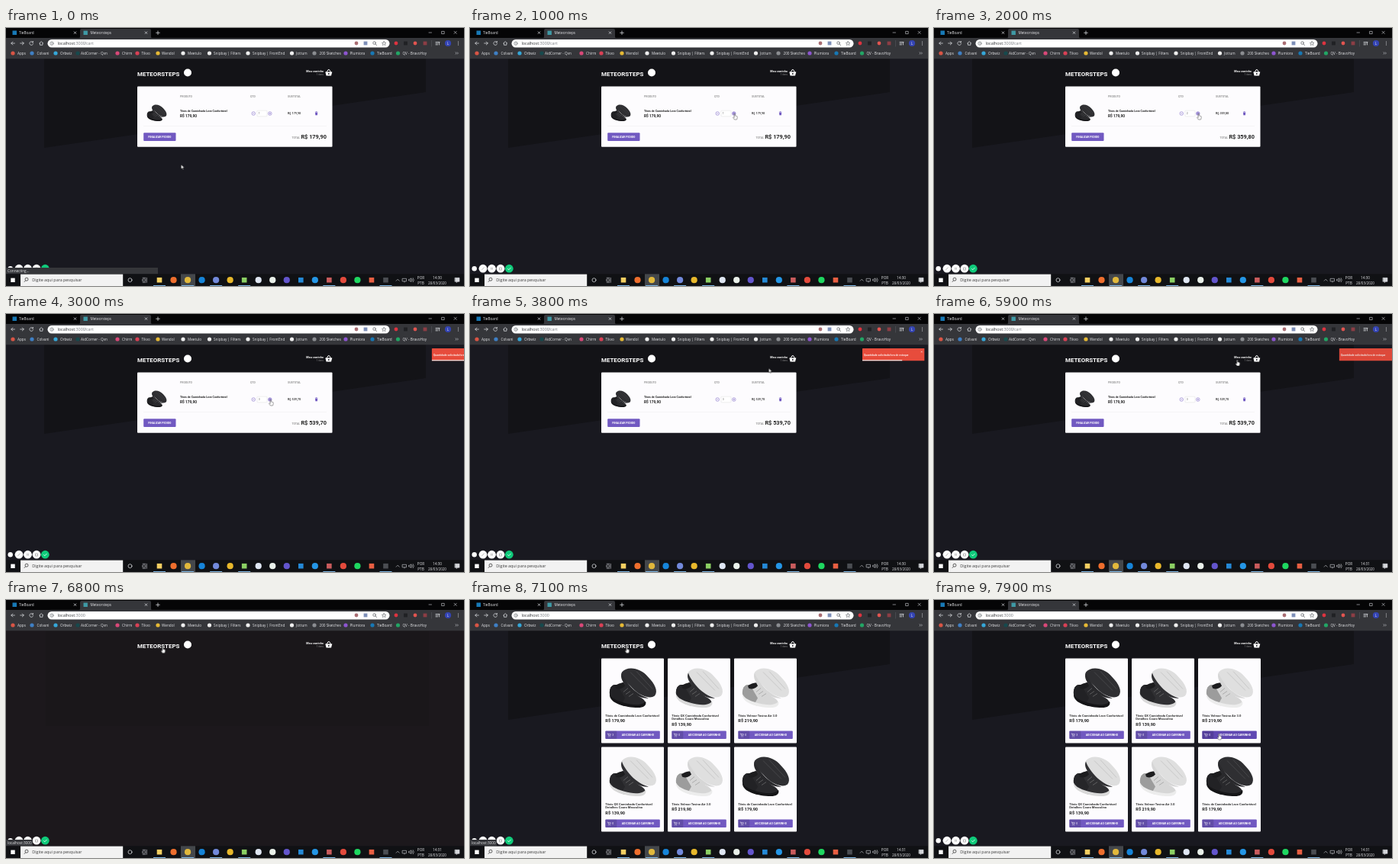
Write an HTML page that moves like this. It is 600x338 px and loops after 8000 ms.

```html
<!DOCTYPE html>
<html lang="pt-BR">
<head>
<meta charset="utf-8">
<title>Carrinho</title>
<style>
html, body { margin: 0; width: 100%; height: 100%; overflow: hidden; background: #191920; }
svg { display: block; width: 100vw; height: 100vh; }
text { white-space: pre; }
.ui { font-family: "Open Sans", "Noto Sans", sans-serif; font-size: 4.7px; fill: #e4e5e8; }
.page { font-family: Roboto, Arial, sans-serif; font-weight: 700; fill: #222; }
.line { fill: none; stroke: #d4d6da; stroke-width: .8; stroke-linecap: round; stroke-linejoin: round; }
.dark { stroke: #5f6368; }
.url { font-size: 5.4px; fill: #777b80; }
.mid { text-anchor: middle; }
.end { text-anchor: end; }
.label { fill: #999; font-size: 3.5px; }
.light { fill: #fff; }
.thin { font-weight: 400; }
.accent { fill: #7159c1; }

/* hard changes */
.connecting, .cart, .shop, .blank, .one, .two, .three, .before, .after,
.toCart, .toHome, .menu, .plus, .arrow, .hand, .hot { animation: 8s step-end infinite; }
.connecting { animation-name: connecting; }
.cart { animation-name: cart; }
.shop { animation-name: shop; }
.blank { animation-name: blank; }
.one { animation-name: one; }
.two { animation-name: two; }
.three { animation-name: three; }
.before { animation-name: before; }
.after { animation-name: after; }
.toCart { animation-name: toCart; }
.toHome { animation-name: toHome; }
.menu { animation-name: menu; }
.plus { animation-name: plus; }
.arrow { animation-name: arrow; }
.hand { animation-name: hand; }
.hot { animation-name: hot; }
@keyframes connecting { 0% { opacity: 1 } 6.9%, 100% { opacity: 0 } }
@keyframes cart { 0% { opacity: 1 } 83.1%, 100% { opacity: 0 } }
@keyframes shop { 0% { opacity: 0 } 88.7%, 100% { opacity: 1 } }
@keyframes blank { 0% { opacity: 0 } 83.1% { opacity: 1 } 88.7%, 100% { opacity: 0 } }
@keyframes one { 0% { opacity: 1 } 18.1%, 100% { opacity: 0 } }
@keyframes two { 0% { opacity: 0 } 18.1% { opacity: 1 } 25.6%, 100% { opacity: 0 } }
@keyframes three { 0% { opacity: 0 } 25.6%, 100% { opacity: 1 } }
@keyframes before { 0% { opacity: 1 } 51.3%, 100% { opacity: 0 } }
@keyframes after { 0% { opacity: 0 } 51.3%, 100% { opacity: 1 } }
@keyframes toCart { 0% { opacity: 0 } 49.4% { opacity: 1 } 71.9%, 100% { opacity: 0 } }
@keyframes toHome { 0% { opacity: 0 } 79.2% { opacity: 1 } 91.9%, 100% { opacity: 0 } }
@keyframes menu { 0% { opacity: 1 } 49.4% { opacity: .7 } 71.9%, 100% { opacity: 1 } }
@keyframes plus { 0% { fill: #fff } 10.6% { fill: #b9aee0 } 43.8%, 100% { fill: #fff } }
@keyframes arrow { 0% { opacity: 1 } 10.6% { opacity: 0 } 43.8% { opacity: 1 } 49.4% { opacity: 0 } 74.6% { opacity: 1 } 78.6% { opacity: 0 } 91.9% { opacity: 1 } 96.2%, 100% { opacity: 0 } }
@keyframes hand { 0% { opacity: 0 } 10.6% { opacity: 1 } 43.8% { opacity: 0 } 49.4% { opacity: 1 } 74.6% { opacity: 0 } 78.6% { opacity: 1 } 91.9% { opacity: 0 } 96.2%, 100% { opacity: 1 } }
@keyframes hot { 0% { fill: #7159c1 } 96.2%, 100% { fill: #6048b2 } }

.cursor { animation: cursor 8s ease-in-out infinite; }
@keyframes cursor {
  0%, 2% { transform: translate(229.5px, 179px) }
  11%, 43% { transform: translate(346.7px, 112px) }
  49.6%, 70% { transform: translate(403.3px, 60.5px) }
  73%, 74% { transform: translate(397.3px, 60px) }
  79%, 91.3% { transform: translate(205.3px, 61.5px) }
  97%, 100% { transform: translate(373.3px, 175px) }
}
.toast { animation: toast 8s cubic-bezier(.215, .61, .355, 1) infinite; }
@keyframes toast {
  0%, 34.07% { transform: translateX(750px); opacity: 1 }
  39.69% { transform: translateX(-6px) }
  41.1% { transform: translateX(2.5px) }
  42.5% { transform: translateX(-1.25px) }
  43.44% { transform: none }
  71.44% { transform: none; animation-timing-function: ease }
  73.31% { transform: translateX(-5px); opacity: 1; animation-timing-function: ease }
  80.8% { transform: translateX(500px); opacity: 0 }
  100% { transform: translateX(750px); opacity: 0 }
}
.progress { transform-box: fill-box; transform-origin: left; animation: progress 8s linear infinite; }
@keyframes progress {
  0%, 34.07% { transform: none }
  71.57%, 100% { transform: scaleX(0) }
}
</style>
</head>
<body>
<svg viewBox="0 0 600 338" preserveAspectRatio="none">
  <rect width="600" height="338" fill="#191920"/>
  <path d="M50 40H550V84L50 157Z" fill="#131317"/>
  <g class="blank">
    <rect y="40" width="600" height="283" fill="#1c181c"/>
    <rect x="52" y="40" width="502" height="125" fill="#1a171a"/>
  </g>

  <!-- page header -->
  <g class="page">
    <text class="light" x="172" y="62.7" font-size="7.9">METEORSTEPS</text>
    <circle class="light" cx="238" cy="58.5" r="5"/>
    <g class="menu">
      <text class="end light" x="416" y="58" font-size="3.8">Meu carrinho</text>
      <text class="end thin" x="416" y="62.2" font-size="3.2" fill="#888">1 itens</text>
      <path class="light" d="M418.3 57.6H427.3L426 62.6H419.6Z"/>
      <path d="M420 58L422 54.7H423.6L425.6 58" fill="none" stroke="#fff"/>
      <circle cx="422.8" cy="60" r=".9" fill="#191920"/>
    </g>
  </g>

  <!-- cart -->
  <g class="cart page">
    <rect x="172" y="76.5" width="255.5" height="79.3" rx="1" fill="#fdfcfe"/>
    <text class="label" x="228" y="91.3">PRODUTO</text>
    <text class="label" x="320" y="91.3">QTD</text>
    <text class="label" x="369" y="91.3">SUBTOTAL</text>
    <g id="thumb" transform="translate(180.2 95) scale(.42)"></g>
    <text x="228" y="109.9" font-size="3.63">Tênis de Caminhada Leve Confortável</text>
    <text x="228" y="116.7" font-size="4.8">R$ 179,90</text>
    <g fill="#fff" stroke="#7159c1" stroke-width=".5">
      <circle cx="324.2" cy="112" r="2.3"/>
      <circle class="plus" cx="345.8" cy="112" r="2.3"/>
      <path d="M323 112H325.4M344.6 112H347M345.8 110.8V113.2"/>
      <rect x="329" y="108.2" width="13" height="7.6" rx=".8" stroke="#ddd"/>
    </g>
    <g id="amounts"></g>
    <path class="accent" d="M405 110.7H408.2L407.9 114.3H405.3ZM404.8 109.7H405.9L406.2 109.3H407L407.3 109.7H408.4V110.3H404.8Z"/>
    <path d="M180 128.5H420" stroke="#eee" stroke-width=".5"/>
    <rect class="accent" x="180.2" y="137.2" width="42.3" height="10.8" rx="1"/>
    <text class="mid light" x="201.3" y="143.9" font-size="3.45">FINALIZAR PEDIDO</text>
    <text class="label end" x="385" y="145.2">TOTAL</text>
  </g>

  <g id="shop" class="shop page"></g>

  <!-- toast -->
  <g class="toast">
    <rect x="514" y="45" width="81.3" height="16.3" rx=".5" fill="#e74c3c"/>
    <text class="page light" x="516" y="54.8" font-size="3.45" style="font-weight:500">Quantidade solicitada fora de estoque</text>
    <path d="M590.8 48.6L592.6 50.4M592.6 48.6L590.8 50.4" stroke="#fff" stroke-width=".6"/>
    <rect class="progress" x="514" y="60" width="81.3" height="1.3" fill="#fff" opacity=".8"/>
  </g>

  <!-- recorder bubbles -->
  <g fill="#fff">
    <circle cx="5.7" cy="315.2" r="3.2"/>
    <circle cx="17" cy="315.2" r="5.4"/>
    <circle cx="28.5" cy="315.2" r="5.4"/>
    <circle cx="40" cy="315.2" r="5.4"/>
    <circle cx="51.3" cy="315.2" r="5.4" fill="#0fca7a"/>
    <path d="M15.4 317L18.6 313.5M27.7 313.7V316.7M29.3 313.7V316.7M38.5 314H41.5V317H38.5Z" fill="none" stroke="#999" stroke-width=".7"/>
    <path d="M49.2 315.3L50.8 316.8L53.5 313.9" fill="none" stroke="#fff" stroke-width=".8"/>
  </g>

  <!-- link status -->
  <g class="ui">
    <g class="connecting"><rect y="314" width="199" height="8.5" fill="#35363a"/><text x="2" y="320">Connecting...</text></g>
    <g class="toCart"><rect y="314" width="45.5" height="8.5" fill="#35363a"/><text x="2" y="320">localhost:3000/cart</text></g>
    <g class="toHome"><rect y="314" width="35" height="8.5" fill="#35363a"/><text x="2" y="320">localhost:3000</text></g>
  </g>

  <!-- browser -->
  <g class="ui">
    <rect width="600" height="13.5" fill="#050506"/>
    <path d="M95 13.5Q97 13.5 97 11.5V3Q97 1 99 1H188Q190 1 190 3V11.5Q190 13.5 192 13.5Z" fill="#35363a"/>
    <rect y="13" width="600" height="27.3" fill="#35363a"/>
    <rect x="54.5" y="15" width="448" height="10.6" rx="5.3" fill="#fff"/>
    <rect x="8.5" y="3.5" width="5.5" height="5.5" fill="#1778b5"/>
    <text x="17" y="8.3">TieBoard</text>
    <rect x="101.5" y="3.6" width="5.4" height="5.4" fill="#3f9aa5"/>
    <text x="110.5" y="8.3">Meteorsteps</text>
    <text class="url" x="67.500" y="22.2"><tspan fill="#2b2d30">localhost</tspan>:3000<tspan class="path"></tspan></text>
    <text class="url cart" x="103" y="22.2">/cart</text>
    <g class="line">
      <path d="M89.2 4.9L91.8 7.5M91.8 4.9L89.2 7.5M182.2 4.9L184.8 7.5M184.8 4.9L182.2 7.5M196.7 6.3H201.3M199 4V8.6"/>
      <path d="M554 6H557.5M571 4.4H574.2V7.6H571ZM587 4.2L590.3 7.5M590.3 4.2L587 7.5" stroke-width=".6"/>
      <path d="M11.4 20H6.8M8.8 18L6.8 20L8.8 22M35.2 18.6A2.4 2.4 0 1 0 35.6 20.7M35.4 17.4V18.9H33.9M43.7 20L46.2 17.7L48.7 20M44.5 19.7V22.3H47.9V19.7"/>
      <path d="M18.7 20H23.3M21.3 18L23.3 20L21.3 22"/>
      <path d="M563 18.5H568M563 20.2H566M563 21.9H565.5M567.5 18.5V22"/>
      <path d="M589 31.8L590.2 33L589 34.2M591.2 31.8L592.4 33L591.2 34.2" stroke-width=".6"/>
    </g>
    <g class="line dark">
      <circle cx="60" cy="20.2" r="2.2" stroke-width=".6"/><path d="M60 20V21.2M60 19V19.1" stroke-width=".6"/>
      <circle cx="482.6" cy="19.6" r="1.8"/><path d="M484 21L485.6 22.6"/>
      <path d="M495.2 17.5L496 19.3L498 19.4L496.5 20.7L497 22.6L495.2 21.6L493.4 22.6L493.9 20.7L492.4 19.4L494.4 19.3Z" stroke-width=".6"/>
    </g>
    <path d="M557.5 16V24.5" stroke="#5b5d62" stroke-width=".5"/>
    <circle cx="579" cy="20" r="4.1" fill="#3444b4"/><text class="mid" x="579" y="21.7">L</text>
    <g fill="#d4d6da"><circle cx="592.5" cy="18" r=".6"/><circle cx="592.5" cy="20" r=".6"/><circle cx="592.5" cy="22" r=".6"/></g>
    <g id="extensions"></g>
    <g id="bookmarks"></g>
  </g>

  <!-- taskbar -->
  <g class="ui">
    <rect y="322.3" width="600" height="15.7" fill="#101114"/>
    <rect x="6.3" y="327.6" width="5.4" height="5.4" fill="#fff"/>
    <rect x="19" y="322.6" width="134.2" height="15.4" fill="#f2f2f2"/>
    <g fill="none" stroke="#222" stroke-width=".7"><circle cx="27" cy="329.2" r="2"/><path d="M25.6 330.8L23.8 332.8"/></g>
    <text x="34.3" y="332.2" style="font-size:5.35px;fill:#3a3a3a">Digite aqui para pesquisar</text>
    <rect x="229" y="322.3" width="19" height="15.7" fill="#44474b"/>
    <g class="line">
      <circle cx="162.5" cy="330.2" r="2.5"/>
      <path d="M179.2 329H182.8V331.7H179.2ZM179.2 327.3H182.8M179.2 333.3H182.8M184.3 327.3V333.3" stroke-width=".6"/>
      <path d="M511.2 331.2L513.2 329.2L515.2 331.2M519.5 328.3H524.5V331.8H519.5ZM522 332V333M528 329.3H529L530.7 327.8V332.5L529 331H528ZM532 328.7Q533.3 330.2 532 331.6M533.3 327.6Q535.6 330.2 533.3 332.8" stroke-width=".6"/>
      <path d="M588.3 327.3H594V332.2H591.6L590.3 333.6V332.2H588.3Z" fill="#d4d6da" stroke-width=".6"/>
    </g>
    <g id="apps"></g>
    <g class="mid">
      <text x="543.5" y="328.8">POR</text><text x="543.5" y="336">PTB</text>
      <text class="before" x="565" y="328.8">14:30</text><text class="after" x="565" y="328.8">14:31</text>
      <text x="565" y="336" style="font-size:4.5px">28/03/2020</text>
    </g>
  </g>

  <!-- pointer -->
  <g class="cursor" stroke="#111" stroke-width=".4" fill="#fff">
    <path class="arrow" d="M0 0V5.6L1.3 4.4L2.2 6.4L3 6L2.2 4.1H3.9Z"/>
    <path class="hand" d="M-.6 .5Q0 -.3 .6 .5V3Q1.2 2.6 1.6 3.2Q2.2 2.9 2.5 3.5Q3.2 3.3 3.3 4V6L2.6 8H-.4L-2.2 5.2Q-2 4.1-.6 5.3Z"/>
  </g>
</svg>
<script>
const fill = (id, items, draw) => {
  document.getElementById(id).innerHTML = items.map(draw).join("");
};
const dot = (x, y, r, color) => `<circle cx="${x}" cy="${y}" r="${r}" fill="${color}"/>`;
const box = (x, y, r, color) => `<rect x="${x - r}" y="${y - r}" width="${2 * r}" height="${2 * r}" fill="${color}"/>`;

// upper, quarter, sole and back shoe
const styles = {
  black: ["#29292c", "#222225", "#151517", "#2f2f32"],
  mixed: ["#303033", "#262629", "#d9d9d9", "#dedede"],
  white: ["#d6d6d6", "#9c9c9c", "#ececec", "#dfdfdf"]
};
const shoes = name => {
  const [upper, quarter, sole, back] = styles[name];
  return `<path d="M27 18C35 9 52 13 61 24C70 33 75 43 70 49C62 55 46 46 38 36C31 29 24 24 27 18Z" fill="${back}"/>
    <path d="M27 19C30 29 45 48 62 52C51 54 38 44 31 34C26 28 25 23 27 19Z" fill="${upper}"/>
    <path d="M38 18L62 42M46 17L67 40" stroke="#8884" stroke-width="1"/>
    <path d="M11 47C10 38 15 33 21 35L29 31C35 37 43 47 53 52C59 56 59 60 54 62L30 62C20 59 12 54 11 47Z" fill="${upper}"/>
    <path d="M11 47C10 38 15 33 21 35L31 52L27 59C18 56 12 52 11 47Z" fill="${quarter}"/>
    <path d="M18 36Q23 32 29 32L31 36Q25 42 19 39Z" fill="#1d1d1f"/>
    <path d="M29 44L35 39M32 47L38 43M36 50L42 46" stroke="#8888" stroke-width="1"/>
    <path d="M11 47C15 55 28 58 38 60C48 62 56 60 58 56C60 62 55 64.5 48 64.5C32 64.5 10 59 11 47Z" fill="${sole}"/>`;
};
document.getElementById("thumb").innerHTML = shoes("black");

fill("amounts", [["one", 1, "179,90"], ["two", 2, "359,80"], ["three", 3, "539,70"]], ([name, count, sum]) =>
  `<g class="${name}">
    <text class="thin" x="330.7" y="113.3" font-size="3.5" fill="#666">${count}</text>
    <text x="369" y="113.4" font-size="3.8" style="font-weight:500">R$ ${sum}</text>
    <text class="end" x="420" y="145.3" font-size="7.35">R$ ${sum}</text>
  </g>`);

const goods = {
  black: ["179,90", "Tênis de Caminhada Leve Confortável"],
  mixed: ["139,90", "Tênis QX Caminhada Confortável", "Detalhes Couro Masculino"],
  white: ["219,90", "Tênis Velmor Tavino Air 3.0"]
};
fill("shop", ["black", "mixed", "white", "mixed", "white", "black"], (name, i) => {
  const [price, ...title] = goods[name];
  const x = 172 + i % 3 * 87, y = 76.5 + Math.floor(i / 3) * 116;
  return `<g transform="translate(${x} ${y})">
    <rect width="82" height="111" rx="1" fill="#fdfcfe"/>
    ${shoes(name)}
    ${title.map((line, n) => `<text x="5.3" y="${76 + n * 4.7}" font-size="4.15" fill="#333">${line}</text>`).join("")}
    <text x="5.3" y="${78.9 + title.length * 4.7}" font-size="5.65">R$ ${price}</text>
    <rect class="accent ${i === 2 ? "hot" : ""}" x="5.3" y="95" width="71.5" height="10.5" rx="1"/>
    <rect x="5.3" y="95" width="15" height="10.5" rx="1" fill="#0002"/>
    <path d="M7.8 98.5H8.8L9.5 101.2H11.8L12.3 99.2H9" fill="none" stroke="#fff" stroke-width=".5"/>
    ${dot(9.8, 102.5, .4, "#fff")}${dot(11.5, 102.5, .4, "#fff")}
    <text class="thin light" x="14.2" y="101.6" font-size="3.5">${i ? 0 : 3}</text>
    <text class="mid light" x="48" y="101.6" font-size="3.5">ADICIONAR AO CARRINHO</text>
  </g>`;
});

fill("bookmarks", [
  [9, "#d85545", 15, "Apps"], [34, "#3f7fc4", 40.5, "Colvani"], [65, "#35a7d8", 71, "Orbwiz"],
  [94, "#17494d", 98, "AidCorner - Qvn"], [146, "#d94878", 152, "Chirm"], [172, "#d94055", 177.5, "Tikvo"],
  [199, "#e6b934", 204, "Wendol"], [232, "#eeeeee", 238, "Meetulo"], [266.5, "#eeeeee", 272, "Snipbay | Filters"],
  [317, "#eeeeee", 323, "Snipbay | FrontEnd"], [374.5, "#eeeeee", 380, "Jottum"], [404, "#8b8d91", 410.5, "200 Sketches"],
  [445, "#8d55d0", 450.5, "Plumiora"], [480, "#1778b5", 486, "TieBoard"], [513.5, "#22a565", 519.5, "QV - BravoHoy"]
], ([x, color, tx, label]) => dot(x, 33, 2.6, color) + `<text x="${tx}" y="34.8">${label}</text>`);

fill("extensions", [
  [459, "#a96d72"], [471, "#7d8fb8"], [511, "#dd3340"], [523.5, "#202124"], [536, "#e15450"], [549, "#8c3e45"]
], ([x, color], i) => (i % 2 ? box : dot)(x, 20, 2.4, color));

const apps = ["#f4cf62", "#ee6e2d", "#e1b83c", "#1684d8", "#7289da", "#e8b82b", "#8bcf63", "#dfe6f2", "#e9f0e9",
  "#6355cc", "#2489d6", "#2496e6", "#c95c5d", "#e34a3c", "#1ed760", "#e85f42", "#4a4d52"];
const square = [0, 6, 10, 12, 15, 16], running = [0, 2, 4, 6, 12, 16];
fill("apps", apps, (color, i) => {
  const x = 201 + i * 18.53;
  const mark = square.includes(i) ? box(x, 330.2, 3.3, color) : dot(x, 330.2, 4.1, color);
  return mark + (running.includes(i) ? `<rect x="${x - 8}" y="337" width="16" height="1" fill="#7eb6e4"/>` : "");
});
</script>
</body>
</html>
```
